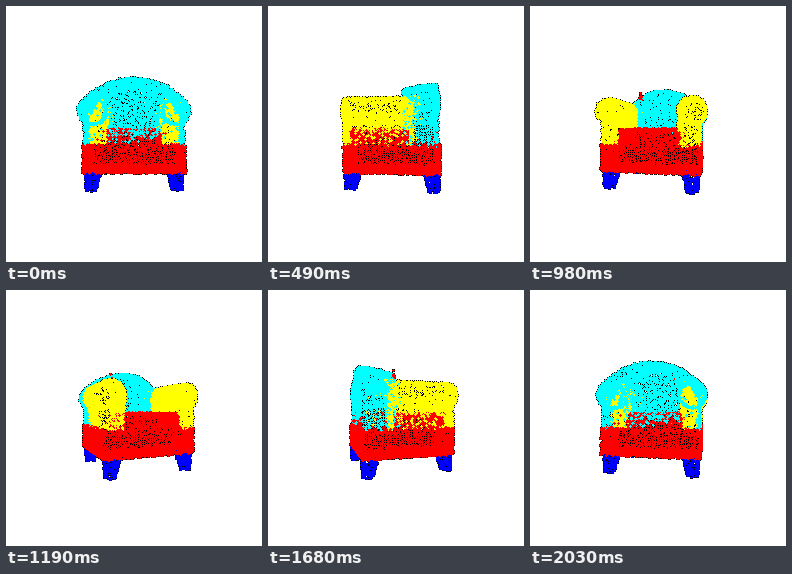
Animation, 256 px wide and 256 px high, one loop 2100 ms. Source, as a matplotlib script:

```python
import numpy as np
import matplotlib.pyplot as plt
from matplotlib.animation import FuncAnimation

SIZE, FRAMES, STEP = 256, 30, 70
CX, CY, DIST = 127.5, 121, 220
DEEP, WIDE, FLOOR = 39.5, 42, -37.5
RIM_DROP = 40
CYAN, YELLOW, RED, BLUE, BLACK = range(5)
PALETTE = np.array([[0, 255, 255], [255, 255, 0], [255, 0, 0],
                    [0, 0, 255], [0, 0, 0]], np.uint8)

rng = np.random.default_rng(4)
cloud = []


def spread(area, density):
    """Evenly scattered pairs in the unit square."""
    n = max(int(area * density), 4)
    k = np.arange(n)
    jitter = rng.normal(0, 0.3 / np.sqrt(n), (2, n))
    u = (k * 0.754878 + rng.random() + jitter[0]) % 1
    v = (k * 0.569840 + rng.random() + jitter[1]) % 1
    return u, v


def add(x, y, z, color):
    x, y, z, color = np.broadcast_arrays(x, y, z, color)
    pts = np.stack([x, y, z], 1) + rng.normal(0, 0.3, (x.size, 3))
    cloud.append(np.column_stack([pts, color]))


def lerp(a, b, t):
    return a + (b - a) * t


def arm_color(z):
    """Yellow in front, dissolving into cyan towards the back."""
    return np.where(rng.random(z.size) < (28 - z) / 20, YELLOW, CYAN)


def panel(xs, ys, zs, color, density):
    """Flat axis-aligned rectangle; one of the ranges has zero length."""
    spans = [abs(b - a) for a, b in (xs, ys, zs)]
    flat = spans.index(0)
    sides = [s for i, s in enumerate(spans) if i != flat]
    uv = list(spread(sides[0] * sides[1], density))
    uv.insert(flat, np.zeros_like(uv[0]))
    x, y, z = (lerp(a, b, t) for (a, b), t in zip((xs, ys, zs), uv))
    add(x, y, z, color(z) if callable(color) else color)


def arch(x):
    return 14 + 27 * np.clip(1 - (x / 46.5) ** 2, 0, 1) ** 0.7


def back():
    # rear shell
    u, v = spread(93 * 56, 0.14)
    x, y = lerp(-46.5, 46.5, u), lerp(-15, 41, v)
    wide = 41.5 + 5 * np.clip((y - 3) / 11, 0, 1)
    keep = (y <= arch(x)) & (abs(x) < wide)
    over_arm = (abs(x) > 22) & (abs(x) < 41) & (y < 24)
    keep &= ~over_arm | (rng.random(x.size) < 0.3)
    x, y = x[keep], y[keep]
    fade = np.clip(-y / 15, 0, 1) * (abs(x) < 32)
    add(x, y, 38, np.where(rng.random(x.size) < fade, RED, CYAN))

    # rolled top
    u, v = spread(125 * 31, 0.27)
    phi = (u - 0.5) * np.pi
    x = 46.5 * np.sin(phi) * (0.7 + 0.3 * v)
    y = 14 + 27 * np.cos(phi) ** 1.4 - 4 * (1 - v) ** 2
    z = lerp(8, 39, v)
    add(x, y, z, np.where((abs(x) > 28) & (z < 20), YELLOW, CYAN))

    # inner face
    u, v = spread(54 * 38, 0.33)
    x = lerp(-27, 27, u)
    y = lerp(-12, arch(x / 0.75) - 5, v)
    add(x, y, 10, np.where(rng.random(x.size) < -y / 12, RED, CYAN))
    add(rng.normal(20, 1.3, 12), rng.normal(31.5, 1.5, 12), 9, RED)


def cap(side, z, density):
    u, v = spread(415, density)
    r, a = 11 * np.sqrt(u), 2 * np.pi * v
    add(side * 35.5 + r * np.cos(a), 14 + r * np.sin(a), z, YELLOW)
    panel((side * 26, side * 41), (-15, 6), (z, z), YELLOW, density)


def arm(side):
    u, v = spread(70 * 78, 0.18)
    a, z = 2 * np.pi * u, lerp(-DEEP, 38, v)
    add(side * 35.5 + 11 * np.cos(a), 14 + 11 * np.sin(a), z, arm_color(z))
    outer = (side * 41.5, side * 41.5)
    panel(outer, (-15, 5), (-DEEP, 38), arm_color, 0.09)
    panel(outer, (-15, 20), (20, 38), CYAN, 0.14)
    panel((side * 25, side * 25), (-3, 14), (-DEEP, 14), YELLOW, 0.3)
    cap(side, -DEEP, 0.4)
    cap(side, 16, 0.45)


def seat():
    # side walls are thinner around the middle
    for low, high, density in ((FLOOR, -27, 0.45), (-27, -19, 0.22),
                               (-19, -14, 0.45)):
        for s in (-1, 1):
            panel((-WIDE, WIDE), (low, high), (s * DEEP, s * DEEP),
                  RED, density)
            panel((s * WIDE, s * WIDE), (low, high), (-DEEP, DEEP),
                  RED, density)
    panel((-WIDE, WIDE), (FLOOR, FLOOR), (-DEEP, DEEP), RED, 0.2)
    # cushion
    for s in (-1, 1):
        panel((s * 25, s * 25), (-15, -2), (-DEEP, 14), RED, 0.45)
    panel((-25, 25), (-15, -2), (-DEEP, -DEEP), RED, 0.5)
    panel((-25, 25), (-2, -2), (-DEEP, 12), RED, 0.35)


def leg(sx, sz):
    u, v = spread(34 * 15, 0.27)
    a, r, mid = 2 * np.pi * u, lerp(6.5, 4.2, v), lerp(34.5, 36, v)
    add(sx * (mid + r * np.cos(a)), lerp(FLOOR, -52.5, v),
        sz * (mid - 1 + r * np.sin(a)), BLUE)


back()
seat()
for s in (-1, 1):
    arm(s)
    leg(s, -1)
    leg(s, 1)

X, Y, Z, C = np.concatenate(cloud).T
C = C.astype(int)
# each dot is a coloured cross whose dark corners lie further back
BALL = [(dx, dy, dx * dy != 0) for dx in (-1, 0, 1) for dy in (-1, 0, 1)]


def render(i):
    a = 2 * np.pi * i / FRAMES
    x = X * np.cos(a) + Z * np.sin(a)
    depth = Z * np.cos(a) - X * np.sin(a)
    scale = DIST / (DIST - depth)
    col = np.rint(CX + x * scale).astype(int)
    row = np.rint(CY - Y * scale).astype(int)

    cols = np.concatenate([col + dx for dx, _, _ in BALL])
    rows = np.concatenate([row + dy for _, dy, _ in BALL])
    near = np.concatenate([depth - RIM_DROP * rim for _, _, rim in BALL])
    tint = np.concatenate([np.full_like(C, BLACK) if rim else C
                           for _, _, rim in BALL])
    # the nearest spot wins each pixel
    order = np.argsort(near, kind="stable")
    img = np.full((SIZE, SIZE, 3), 255, np.uint8)
    img[rows[order], cols[order]] = PALETTE[tint[order]]
    return img


fig = plt.figure(figsize=(2.56, 2.56), dpi=100, facecolor="white")
ax = fig.add_axes([0, 0, 1, 1])
ax.axis("off")
view = ax.imshow(render(0), interpolation="nearest", aspect="auto")


def update(i):
    view.set_data(render(i))
    return [view]


anim = FuncAnimation(fig, update, frames=FRAMES, interval=STEP,
                     repeat=True, repeat_delay=0, blit=False)
plt.show()
```
